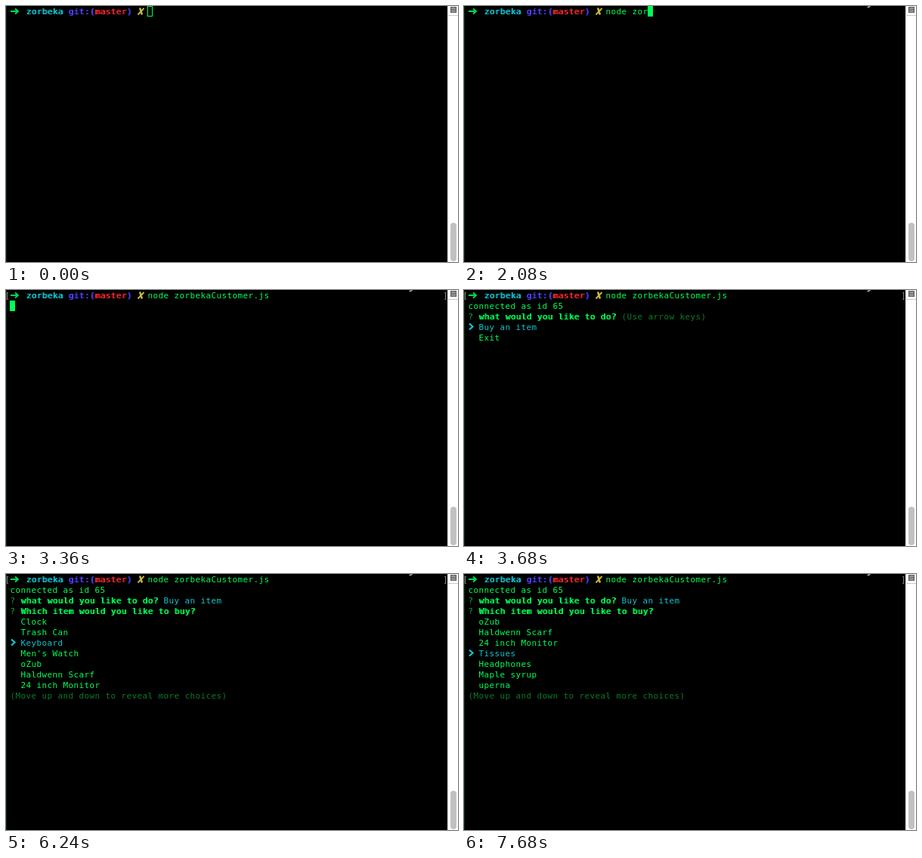
Recreate the animation shown at these times as an HTML page with a canvas. Size 598 by 339 pixels, loop 8 s.

```html
<!DOCTYPE html>
<html lang="en">
<head>
<meta charset="utf-8">
<title>Terminal shop</title>
<style>
html, body { margin: 0; height: 100%; overflow: hidden; background: #000; }
canvas { display: block; }
</style>
</head>
<body>
<canvas id="stage" width="598" height="339"></canvas>
<script>
const ctx = document.getElementById('stage').getContext('2d');
const LOOP = 8000, CELL = 7, ROW = 14, LEFT = 5;
const GREEN = '#00ff55', DIM = '#0a7a2a', CYAN = '#12c4d0', MARK = '#12a83a';
const BLUE = '#4f40ff', RED = '#f0282e', ARROW = '#00d850', CROSS = '#c2b83c', GREY = '#8a8a80';

const COMMAND = 'node zorbekacus';
const ITEMS = ['Clock', 'Trash Can', 'Keyboard', "Men's Watch", 'oZub', 'Haldwenn Scarf',
  '24 inch Monitor', 'Tissues', 'Headphones', 'Maple syrup', 'uperna'];
// [time, characters typed]
const TYPING = [[1440, 3], [1600, 4], [1760, 5], [1920, 6], [2080, 8], [2240, 9],
  [2400, 11], [2560, 12], [2720, 14], [2880, 15]];
// [time, selected item]
const SELECTION = [[4800, 0], [6240, 2], [6400, 3], [6560, 5], [6720, 6], [7680, 7]];

const valueAt = (steps, t) => steps.reduce((v, [start, value]) => t >= start ? value : v, 0);

function rect(x, y, w, h, color) {
  ctx.fillStyle = color;
  ctx.fillRect(x, y, w, h);
}

// Bold is the regular face struck twice, one pixel apart
function text(str, col, row, color, bold) {
  ctx.font = '11px "DejaVu Sans Mono", monospace';
  ctx.fillStyle = color;
  [...str].forEach((ch, i) => {
    const x = LEFT + 0.4 + (col + i) * CELL, y = row * ROW + 11;
    ctx.fillText(ch, x, y);
    if (bold) ctx.fillText(ch, x + 1, y);
  });
}

function line(points, color, width) {
  ctx.strokeStyle = color;
  ctx.lineWidth = width;
  ctx.beginPath();
  points.forEach(([x, y]) => ctx.lineTo(x, y));
  ctx.stroke();
}

function cursor(col, row, hollow) {
  const x = LEFT + col * CELL, y = row * ROW;
  rect(x, y, CELL, ROW, GREEN);
  if (hollow) rect(x + 1, y + 1, CELL - 2, ROW - 2, '#000');
}

function windowFrame() {
  rect(0, 0, 598, 339, '#000');
  rect(0, 0, 1, 339, '#0b2b12');
  rect(584, 0, 14, 339, '#fff');
  rect(584, 0, 1, 339, '#e4e4e4');
  rect(585, 12, 13, 1, '#c8c8c8');
  rect(588, 1, 8, 8, '#555');
  rect(589, 2, 6, 2, '#999');
  rect(589, 5, 6, 1, '#bbb');
  rect(589, 7, 6, 1, '#bbb');
  ctx.fillStyle = '#c1c1c1';
  ctx.beginPath();
  ctx.roundRect(588, 287, 8, 51, 4);
  ctx.fill();
}

function prompt() {
  line([[6, 7], [15, 7]], ARROW, 2);
  line([[12, 3.5], [16, 7], [12, 10.5]], ARROW, 2);
  text('zorbeka', 3, 0, CYAN, true);
  text('git:(', 11, 0, BLUE, true);
  text('master', 16, 0, RED, true);
  text(')', 22, 0, BLUE, true);
  line([[174.5, 11.5], [182.5, 3]], CROSS, 2);
  line([[177, 2.5], [180, 11.5]], CROSS, 2.4);
}

function commandLine(t) {
  if (t >= 3040) {
    text('[', -1, 0, GREY);
    text(']', 81.8, 0, GREY);
    text('node zorbekaCustomer.js', 26, 0, GREEN);
    if (t < 3360) cursor(50, 0);
    else if (t < 3680) cursor(0, 1);
    return;
  }
  const typed = valueAt(TYPING, t);
  text(COMMAND.slice(0, typed), 26, 0, GREEN);
  if (t < 1120 || t >= 1440) cursor(26 + typed, 0, t < 640);
}

function choices(list, firstRow, selected) {
  list.forEach((item, i) => text(item, 2, firstRow + i, i === selected ? CYAN : GREEN));
  const y = (firstRow + selected) * ROW + 6.5;
  line([[7, y - 4], [11.5, y], [7, y + 4]], CYAN, 2.2);
}

function question(str, row) {
  text('?', 0, row, MARK);
  text(str, 2, row, GREEN, true);
}

function menus(t) {
  text('connected as id 65', 0, 1, GREEN);
  question('what would you like to do?', 2);
  if (t < 4800) {
    text('(Use arrow keys)', 29, 2, DIM);
    choices(['Buy an item', 'Exit'], 3, 0);
    return;
  }
  text('Buy an item', 29, 2, CYAN);
  question('Which item would you like to buy?', 3);
  if (t < 6240) text('(Use arrow keys)', 37, 3, DIM);
  // The pointer stops on the fourth row, then the list scrolls
  const selected = valueAt(SELECTION, t), top = Math.max(0, selected - 3);
  choices(ITEMS.slice(top, top + 7), 4, selected - top);
  text('(Move up and down to reveal more choices)', 0, 11, DIM);
}

function draw(now) {
  const t = now % LOOP;
  windowFrame();
  prompt();
  commandLine(t);
  if (t >= 3680) menus(t);
  if (t >= 480) line([[533.5, 1.5], [535.5, 1.5], [537.5, -0.5]], '#b4b4b4', 1.6);
}

const start = performance.now();
function tick() {
  draw(performance.now() - start);
  requestAnimationFrame(tick);
}
tick();
</script>
</body>
</html>
```
